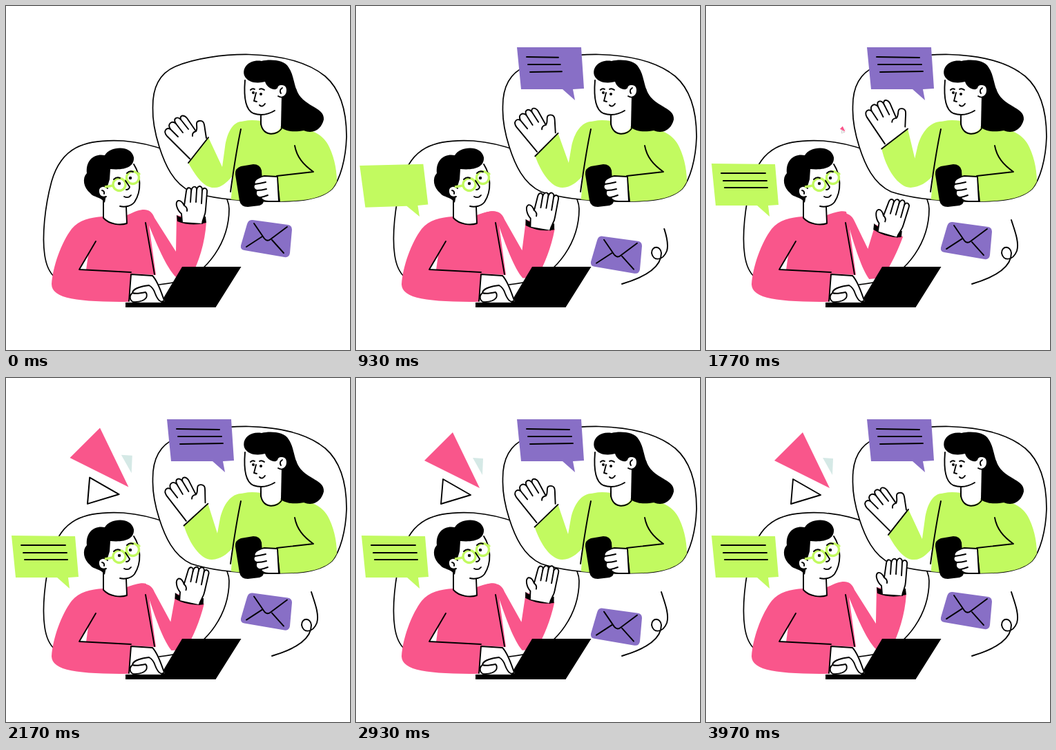
Animation, 498 px wide and 500 px high, one loop 4.01 s. Source, as an HTML page:

```html
<!DOCTYPE html>
<html lang="en">
<head>
<meta charset="utf-8">
<title>Video chat</title>
<style>
  html, body { margin: 0; width: 100%; height: 100%; overflow: hidden; background: #fff; }
  svg { display: block; width: 100vw; height: 100vh; }
  .ln { fill: none; stroke: #000; stroke-width: 1.9; stroke-linecap: round; stroke-linejoin: round; }
  .skin { fill: #fff; }
  .blob { fill: #fff; stroke-width: 1.7; }
  .lime { fill: #c2fa60; }
  .pink { fill: #f9568b; }
  .violet { fill: #886fc6; }
  .draw { stroke-dasharray: 1 2; }
</style>
</head>
<body>
<svg viewBox="0 0 498 500">
  <defs>
    <clipPath id="frame"><use href="#blobW"/></clipPath>
  </defs>

  <path class="ln blob" d="M170 196C112 193 80 206 66 255C56 292 52 335 56 362C60 390 72 404 110 407C160 411 215 408 252 400C292 388 323 342 323 295C323 262 262 204 170 196Z"/>
  <path id="blobW" class="ln blob" d="M212.500 148C212 118 222 98 245 88C272 76 315 70 352 70.500C405 72 440 84 462 102C485 122 493 155 493 190C492 222 484 252 472 266C452 285 412 284 372 284C330 283 292 278 268 270C242 258 230 230 222 205C216 186 212 166 212.500 148Z"/>

  <!-- woman -->
  <g clip-path="url(#frame)">
    <path id="sleeveW" class="lime"/>
    <path class="lime" d="M369 167C355 165 343 166 335 171L325 290H398L396 284L478 284C480 262 481 232 468 205C460 188 445 176 400 174Z"/>
  </g>
  <path class="ln" d="M340 179Q333 212 325 270"/>
  <path id="cuffW" class="ln"/>
  <g id="handW">
    <path class="ln skin" d="M266 222L233 189C227 182 232 176 238 179C233 171 240 166 246 171C241 163 248 160 253 165C251 158 258 158 262 163L275 182C279 177 272 168 280 167C287 166 287 172 288 179L290 192"/>
    <path class="ln" d="M238 179L249 190M246 171L256 184M253 165L264 179M275 182Q269 184 270 189"/>
  </g>
  <path d="M394 100L420 120C428 147 462 146 460 165C457 178 446 187 431 181C420 183 406 184 396 175L397 130Z"/>
  <path class="skin" d="M369 150V172C371 189 394 188 398 175L399 130Z"/>
  <path class="ln" d="M369 165C367 191 394 190 400 176"/>
  <path class="skin" d="M346 106C344 132 347 151 358 156C370 160 382 158 391 149L400 128L386 104Z"/>
  <path class="ln" d="M346 108C344 132 347 151 358 156C370 160 381 157 389 152M369 158V172"/>
  <path d="M345 101C341 88 354 77 370 80C382 77 403 78 409 89C417 100 417 118 424 130L426 150L399 150L403 132L394 117L391 121C384 122 377 117 375 110C364 113 350 112 345 101Z"/>
  <path class="ln skin" d="M392 119C394 111 407 113 407 122C407 131 400 135 394 131"/>
  <path class="ln" d="M400 119Q395 122 398 127"/>
  <path class="ln" d="M354 122Q357 119 360 121M367 121Q370 119 374 122M362 126L359 138L363 139M367 144Q371 148 375 142"/>
  <circle cx="358" cy="126" r="2"/><circle cx="369" cy="128" r="2"/>
  <path class="ln" d="M418 203C421 220 431 231 445 241L392 247L396 284"/>
  <path d="M340 233L358 230Q368 230 370 239L373 283Q373 288 367 290L350 292Q340 292 338 283L332 245Q331 236 340 233Z"/>
  <path class="ln skin" d="M393 248L374 247C364 249 358 254 360 259C357 263 359 267 363 268C360 274 364 279 369 278C371 285 380 284 395 284Z"/>
  <path class="ln" d="M360 259Q368 258 376 256M363 268Q370 268 377 266M369 278Q374 277 379 275"/>

  <!-- man -->
  <path id="sleeveM" class="pink"/>
  <path class="pink" d="M141 306C122 307 106 311 95 324C80 344 68 378 66 404C66 426 105 430 178 430L181 389L217 391L207 318L203 299C196 297 186 300 175 304Z"/>
  <path class="skin" d="M119 362L106 383L116 383.500Z"/>
  <g id="handM">
    <path d="M247 304C258 312 276 308 289 306L290 315Q268 321 248 313Z"/>
    <path class="ln skin" d="M255 314L254 302C248 297 244 286 249 283C253 282 256 286 258 290L261 269C262 262 269 263 268 270C269 260 277 261 276 268C277 259 285 261 284 268C286 262 292 265 291 271L289 296C289 304 285 308 284 316"/>
    <path class="ln" d="M268 270L267 285M276 268L275 285M284 268L283 287M258 290Q263 293 262 298"/>
  </g>
  <path class="ln" d="M202 315L215 390M130 342L106 383L181 387"/>
  <path class="skin" d="M141 270V308C150 318 166 319 175 316L174 285Z"/>
  <path class="ln" d="M141 277V308C150 318 166 319 175 316L174 292"/>
  <path class="skin" d="M140 238L184 228C194 246 197 268 186 285C178 294 163 293 156 287L140 280Z"/>
  <path class="ln" d="M185 230C195 246 197 268 186 285C181 291 172 293 165 291"/>
  <path d="M117 243C115 224 128 214 143 217C150 204 181 201 185 220C186 234 172 239 151 237L150 252L147 262L143 286C136 276 127 279 122 272C112 264 110 250 117 243Z"/>
  <path class="ln skin" d="M147 265C142 259 133 262 134 270C135 277 140 279 145 277"/>
  <path class="ln" d="M139 268Q143 269 142 273"/>
  <g fill="none" stroke="#c2fa60" stroke-width="3.4">
    <circle cx="164" cy="259.500" r="9"/><circle cx="183.500" cy="249.500" r="9"/>
    <path d="M171 255L175 252M155 261L143 263M191 245L194 243"/>
  </g>
  <path class="ln" d="M156 252Q160 248 165 250M175 243Q179 239 184 241M173 254L179 263Q178 267 174 267M171 277Q177 280 181 275"/>
  <circle cx="164" cy="258" r="2.200"/><circle cx="180" cy="250" r="2.200"/>

  <!-- laptop -->
  <path d="M255 379H340.500L303.500 438H173V431H224Z"/>
  <path class="skin" d="M181 390L211 392C222 398 225 417 230 429L222 431H178Z"/>
  <path class="ln" d="M178 429L181 390L212 392C220 400 225 417 229 428C224 433 219 426 216 418Q213 409 207 406M207 406C198 407 184 410 183 417Q188 419 202 416M183 417C178 421 179 428 184 430Q198 431 203 424Q205 419 202 416"/>

  <g id="mail">
    <path class="violet" d="M357 311L408 318Q414 319 414 325L411 359Q410 366 403 365L345 355Q339 354 340 348L349 317Q351 310 357 311Z"/>
    <path class="ln" d="M359 316L374 338Q378 343 383 339L407 321M348 350L371 335M385 340L402 359"/>
  </g>
  <path id="swirl" class="ln draw" pathLength="1" d="M385 404C412 396 442 382 442 359C441 348 428 348 428 359C430 371 444 371 450 356C454 343 446 324 442 311"/>

  <g id="shapes">
    <path class="pink" d="M140 79L99 120L179 160Z"/>
    <path fill="#d5e9e6" d="M169 116L184 117L183 141Z"/>
    <path class="ln skin" d="M126 147L123 183L166 170Z"/>
  </g>

  <g id="sayW">
    <path class="violet" d="M233 60H326L330 120L314 121L317 137L299 121H239Z"/>
    <path class="ln draw" pathLength="1" d="M247 74L309 75"/>
    <path class="ln draw" pathLength="1" d="M249 85L312 85"/>
    <path class="ln draw" pathLength="1" d="M252 96L314 95"/>
  </g>
  <g id="sayM">
    <path class="lime" d="M8 229L100 230L105 289L90 290L92 306L74 290H14Z"/>
    <path class="ln draw" pathLength="1" d="M22 243H86"/>
    <path class="ln draw" pathLength="1" d="M25 254H88"/>
    <path class="ln draw" pathLength="1" d="M27 264H89"/>
  </g>
</svg>
<script>
const LOOP = 4010, WAVE = LOOP / 3, PEAK = 0.365;
const $ = id => document.getElementById(id);
const set = (id, name, value) => $(id).setAttribute(name, value);
const clamp = x => Math.min(1, Math.max(0, x));
const ease = x => (1 - Math.cos(Math.PI * clamp(x))) / 2;
const span = (t, a, b) => clamp((t - a) / (b - a));

// eased value from a list of [time, value]
function track(t, keys) {
  let i = 1;
  while (i < keys.length - 1 && t > keys[i][0]) i++;
  const [t0, v0] = keys[i - 1], [t1, v1] = keys[i];
  return v0 + (v1 - v0) * ease((t - t0) / (t1 - t0));
}

// blend two path strings that share one structure
function blend(a, b, k) {
  const nb = b.match(/-?[\d.]+/g);
  let i = 0;
  return a.replace(/-?[\d.]+/g, n => (+n + (nb[i++] - n) * k).toFixed(2));
}

function pose(id, x, y, scale, turn = 0) {
  set(id, 'transform', `translate(${x} ${y}) rotate(${turn}) scale(${scale}) translate(${-x} ${-y})`);
}

function stroke(el, part) {
  el.style.visibility = part > 0 ? 'visible' : 'hidden';
  el.style.strokeDashoffset = 1 - part;
}

function lines(id, t, from, to) {
  $(id).querySelectorAll('.draw').forEach(el => stroke(el, ease(span(t, from, to))));
}

// each limb: path with the hand low, path with the hand high
const limbs = {
  sleeveW: [
    'M345 168C328 166 320 185 317 205L313 234L293 191L264 228C276 250 288 265 302 264C312 264 320 256 327 248Z',
    'M345 168C326 166 312 182 306 204L302 221L292 178L254 207C260 236 278 264 296 264C310 263 320 256 327 248Z'],
  cuffW: ['M293 191L264 228', 'M292 178L254 207'],
  sleeveM: [
    'M178 303C196 294 209 292 215 308L246 357L247 304L290 314C288 345 279 372 268 394L246 394C232 380 218 346 205 314Z',
    'M178 304C198 298 210 300 215 313L234 353L245 318L285 336C276 360 267 376 256 395L236 397C226 384 215 350 205 314Z']
};

function waveArms(t) {
  const p = t % WAVE / WAVE;
  const k = p < PEAK ? ease(p / PEAK) : 1 - ease((p - PEAK) / (1 - PEAK));
  for (const id in limbs) set(id, 'd', blend(...limbs[id], k));
  set('handW', 'transform', `rotate(${11.5 * k} 373 175)`);
  set('handM', 'transform', `rotate(${13 * k} 191 293)`);
}

function draw(t) {
  waveArms(t);
  set('mail', 'transform', `translate(0 ${12 * (1 - Math.cos(4 * Math.PI * t / LOOP))})`);
  stroke($('swirl'), span(t, 90, 1000));

  pose('sayW', 317, 137, track(t, [[70, 0], [360, 1]]),
    track(t, [[70, -40], [390, 8], [550, -2.2], [720, 0]]));
  lines('sayW', t, 680, 1060);
  pose('sayM', 92, 307, track(t, [[250, 0], [520, 1]]),
    track(t, [[250, -50], [780, 6], [920, -2], [1040, 0]]));
  lines('sayM', t, 990, 1310);

  pose('shapes', 204, 185, track(t, [[1660, 0], [2240, 1.1], [2640, 1]]));
}

const start = performance.now();
function tick() {
  draw((performance.now() - start) % LOOP);
  requestAnimationFrame(tick);
}
draw(0);
requestAnimationFrame(tick);
</script>
</body>
</html>
```
